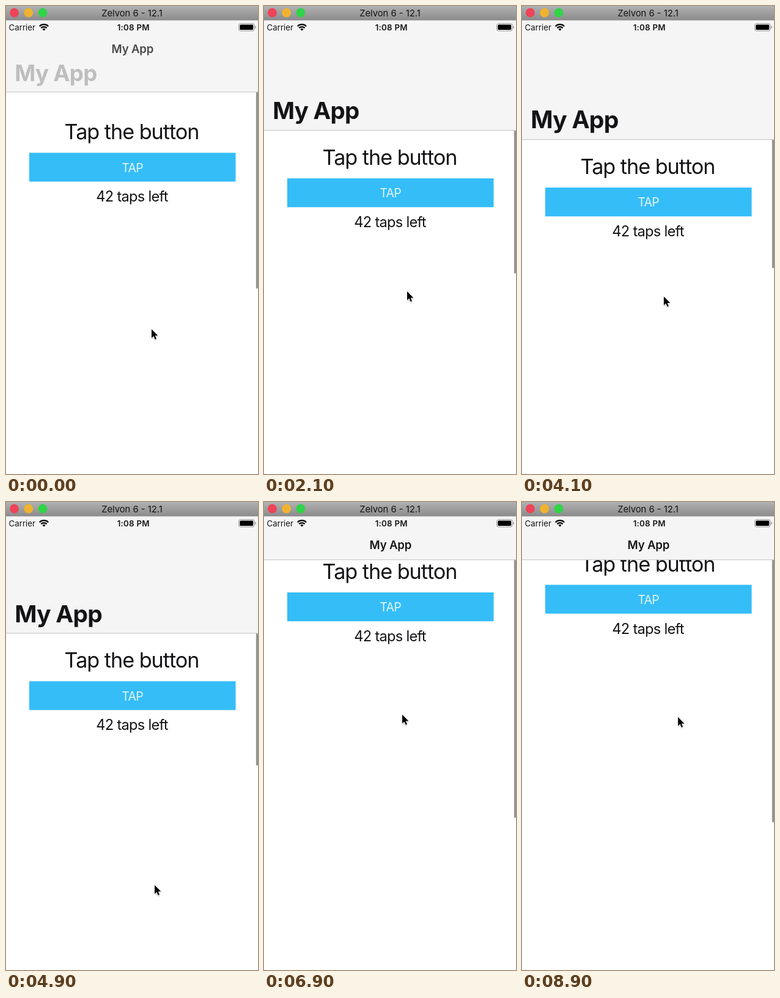
Animation, 412 px wide and 766 px high, one loop 9 s. Source, as an HTML page:

```html
<!DOCTYPE html>
<html lang="en">
<head>
<meta charset="utf-8">
<title>Large title pull</title>
<style>
  html, body { margin: 0; width: 100%; height: 100%; overflow: hidden; background: #fff; }
  svg { display: block; width: 100vw; height: 100vh; }
  text { font-family: Inter, Roboto, sans-serif; fill: #141417; }
  .mid { text-anchor: middle; }
  .status { font-size: 13.3px; }
  .bold { font-weight: 600; }
</style>
</head>
<body>
<svg viewBox="0 0 412 766">
  <defs>
    <linearGradient id="chrome" x2="0" y2="1">
      <stop stop-color="#b1b1b1"/><stop offset="1" stop-color="#8b8b8b"/>
    </linearGradient>
    <clipPath id="below"><rect y="93" width="412" height="673"/></clipPath>
    <filter id="soft" x="-50%" y="-50%" width="200%" height="200%"><feGaussianBlur stdDeviation="1.2"/></filter>
  </defs>
  <rect width="412" height="766" fill="#fff"/>

  <g id="content">
    <text class="mid" x="205.5" y="-21.5" font-size="34.2" letter-spacing="-.03em">Tap the button</text>
    <rect x="38" y=".5" width="337.5" height="47.2" fill="#35bdf8"/>
    <text class="mid" x="206.7" y="31.8" font-size="19.5" letter-spacing="-.03em" style="fill:#e4f6fe">TAP</text>
    <text class="mid" x="206" y="80.5" font-size="23.6" letter-spacing="-.03em">42 taps left</text>
  </g>
  <rect id="thumb" x="408.8" width="3.2" rx="1.5" fill="#929292"/>

  <rect id="nav" y="23" width="412" fill="#f5f5f5"/>
  <rect id="edge" width="412" height="1" fill="#c2c2c2"/>
  <g clip-path="url(#below)">
    <text id="large" font-size="36.6" font-weight="700" letter-spacing="-.02em">My App</text>
  </g>
  <text id="small" class="mid bold" x="206.8" y="77.3" font-size="18.6" letter-spacing="-.01em">My App</text>

  <text class="status" x="4.5" y="39.7">Carrier</text>
  <g fill="none" stroke="#000" stroke-width="2.2">
    <path d="M54.8 33.2a10.2 10.2 0 0 1 14.4 0M57.3 36a6.6 6.6 0 0 1 9.4 0"/>
    <path d="M62 40.6l-2.5-2.6a3.5 3.5 0 0 1 5 0z" fill="#000" stroke="none"/>
  </g>
  <text class="status mid bold" x="208.3" y="39.7" letter-spacing=".02em">1:08 PM</text>
  <rect x="380.5" y="28.8" width="25.5" height="12" rx="3" fill="none" stroke="#929292"/>
  <rect x="382.2" y="30.5" width="22" height="8.6" rx="1.6"/>
  <path d="M407.3 32.6q1.7.6 1.7 2.2t-1.7 2.2z" fill="#929292"/>

  <rect width="412" height="23.5" fill="url(#chrome)"/>
  <circle cx="13.5" cy="11" r="7.4" fill="#ee4358"/>
  <circle cx="36.8" cy="11" r="7.4" fill="#f0b32f"/>
  <circle cx="60" cy="11" r="7.4" fill="#2fd448"/>
  <text class="mid" x="206" y="16.6" font-size="14.8">Zelvon 6 - 12.1</text>

  <g id="cursor">
    <path d="M0 1.5V16L3.4 13 5.7 18.4 8 17.4 5.7 12.2H10.4Z" opacity=".4" filter="url(#soft)"/>
    <path d="M0 0V14.5L3.4 11.4 5.7 16.8 8 15.8 5.7 10.6H10.4Z" stroke="#fff" stroke-width="1.6" paint-order="stroke"/>
  </g>
</svg>
<script>
const LOOP = 9000, STEP = 100;
const BUTTON_REST = 229.5, NAV_GAP = 78, NAV_COMPACT = 94.6;
const NAV_REST = BUTTON_REST - NAV_GAP;
const THUMB = 440, SPRING = 210, SCROLL_LAG = 52;

const drag = (start, end, from, to) => ({ start, end, from, to });
const pulls = [
  drag(-300, 400, [238, 510], [238, 558]),
  drag(1500, 2350, [234, 365], [234, 494]),
  drag(3500, 4750, [222, 341], [243, 627]),
];
const scrolls = [
  drag(5600, 6250, [230, 430], [226, 348]),
  drag(7000, 8250, [226, 348], [276, 80]),
  drag(8250, 9000, [276, 80], [254, 366]),
];
const drags = [...pulls, ...scrolls];

const clamp = (v, lo = 0, hi = 1) => Math.min(hi, Math.max(lo, v));
const ease = u => u * u * (3 - 2 * u);
const set = (id, attrs) => {
  for (const name in attrs) document.getElementById(id).setAttribute(name, attrs[name]);
};

function glide(t, start, end, from, to) {
  const u = ease(clamp((t - start) / (end - start)));
  return from.map((v, i) => v + (to[i] - v) * u);
}

// The pointer follows each drag, then pauses and travels to where the next one begins.
function pointer(t) {
  const i = drags.findLastIndex(d => t >= d.start);
  const now = drags[i], next = drags[i + 1];
  return t <= now.end || !next
    ? glide(t, now.start, now.end, now.from, now.to)
    : glide(t, now.end + 300, next.start - 100, now.to, next.from);
}

const rubberBand = (pull, size = 730) => size * (1 - 1 / (1 + .55 * pull / size));

function stretch(t, { start, end, from, to }) {
  const y = glide(t, start, end, from, to)[1];
  return rubberBand(y - from[1]) * Math.exp(-Math.max(0, t - end) / SPRING);
}

function buttonTop(t) {
  const pulled = pulls.reduce((sum, p) => sum + stretch(t, p), 0);
  const { start, from } = scrolls[0];
  const scrolled = pointer(Math.max(start, t - SCROLL_LAG))[1] - from[1];
  return BUTTON_REST + pulled + scrolled;
}

function draw(t) {
  const button = buttonTop(t);
  const unfolding = 21 * clamp(1 - t / 300);
  const nav = Math.max(NAV_COMPACT, button - NAV_GAP - unfolding);
  const largeAlpha = Math.min(clamp(.24 + t / 250), clamp((nav - 100) / 20));
  const zoom = 1 + Math.max(0, nav - NAV_REST) * .001;
  const thumbEnd = 604 - .59 * button;
  const thumbTop = Math.max(nav, thumbEnd - THUMB);

  set('content', { transform: `translate(0 ${button})` });
  set('thumb', { y: thumbTop, height: thumbEnd - thumbTop });
  set('nav', { height: nav - 23 });
  set('edge', { y: nav - .5 });
  set('large', { transform: `translate(14.3 ${nav - 18.2}) scale(${zoom})`, opacity: largeAlpha });
  set('small', { opacity: 1 - largeAlpha });
  set('cursor', { transform: `translate(${pointer(t)})` });
}

const origin = performance.now();
function tick() {
  const t = (performance.now() - origin) % LOOP;
  draw(Math.floor(t / STEP) * STEP);
  requestAnimationFrame(tick);
}
tick();
</script>
</body>
</html>
```
